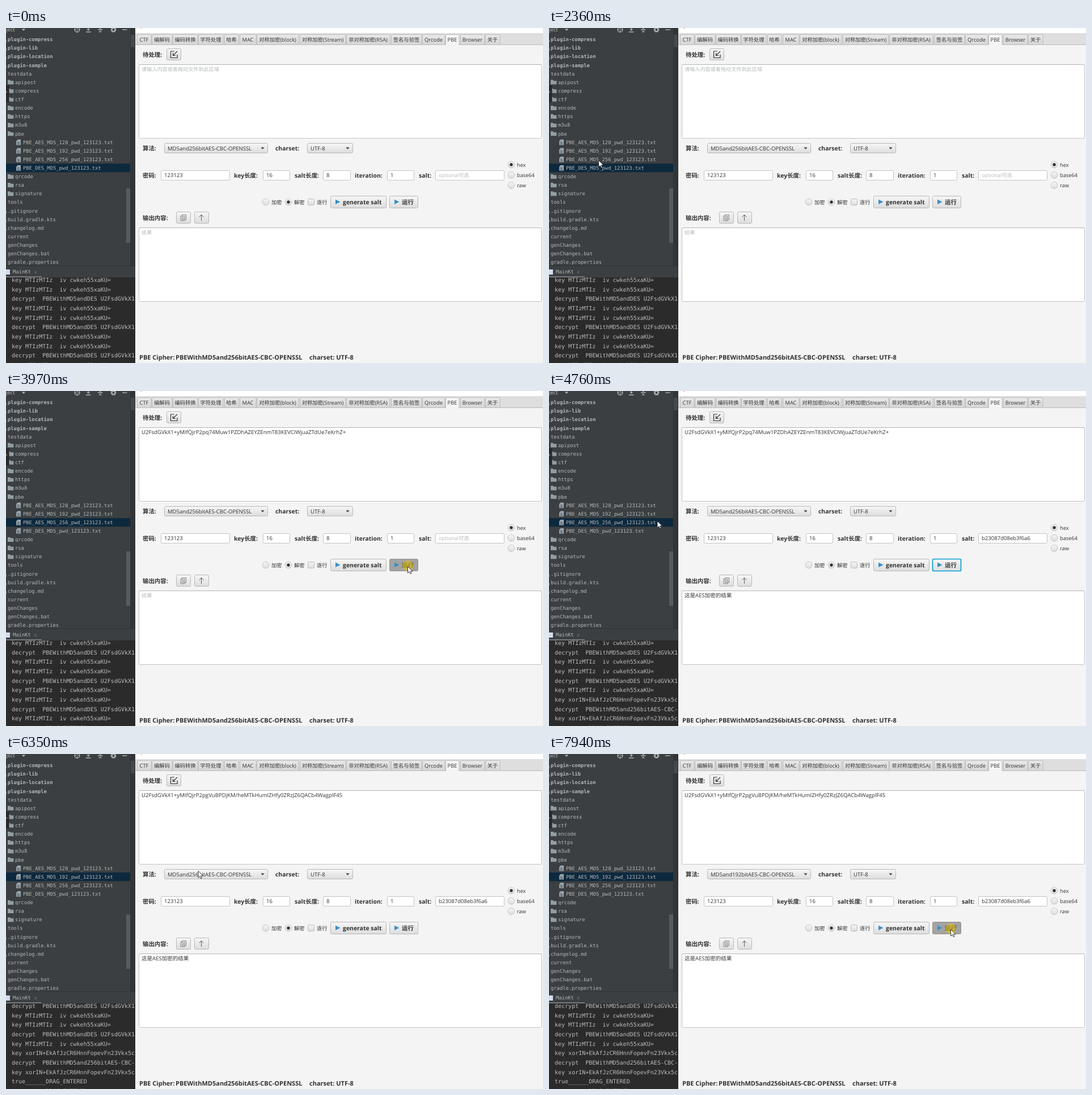
Write an HTML page that moves like this. It is 947x591 px and loops after 8 s.

```html
<!DOCTYPE html>
<html lang="zh-CN">
<head>
<meta charset="utf-8">
<title>PBE Cipher</title>
<style>
html, body { margin: 0; width: 100%; height: 100%; overflow: hidden; background: #f4f4f4; }
svg { display: block; width: 947px; height: 591px; }
text { font: 9.55px "Open Sans", "Noto Sans CJK SC", "Noto Sans", sans-serif; fill: #333; white-space: pre; text-rendering: geometricPrecision; }
.tab { font-size: 9.3px; text-anchor: middle; }
.small { font-size: 9.3px; }
.content { font-size: 9.63px; }
.hint { fill: #b3b8bb; font-size: 9.15px; }
.bold { font-size: 10.45px; font-weight: 700; }
.status { font-size: 11px; font-weight: 700; }
.white { fill: #fff; }
.tree, .log { font-family: "DejaVu Sans Mono", "Noto Sans Mono", monospace; fill: #b5b8ba; }
.tree { font-size: 8.8px; }
.heavy { font-weight: 700; }
.log { font-size: 10.02px; fill: #bbb; }
.head { fill: #bbb; font-size: 9.5px; }
</style>
</head>
<body>
<svg id="stage" viewBox="0 0 947 591" xmlns="http://www.w3.org/2000/svg"></svg>
<script>
const LOOP = 8000;
const BLUE = '#0096c9';
const CIPHER_A = 'U2FsdGVkX1+yMIfQjrP2pq74Muw1PZDhAZEYZEnmT83KEVCIWjuaZTdUe7eKrhZ+';
const CIPHER_B = 'U2FsdGVkX1+yMIfQjrP2pgVuBPDjKM/heMTkHumIZHfy0ZRzJZ6QACb4WagplF45';

// Each step keeps the previous values and overrides some of them.
const steps = [
  { at: 0, cursor: null, row: 15, input: '', salt: '', output: '', log: 'KKDKKDKKDK', run: '', bits: 256, open: false },
  { at: 780, cursor: [174, 233] },
  { at: 1570, cursor: [74, 246] },
  { at: 2360, cursor: [87, 233] },
  { at: 3170, cursor: [522, 270.5], row: 14, input: CIPHER_A, log: 'KDKKDKKDKT' },
  { at: 3970, cursor: [708, 309], run: 'pressed' },
  { at: 4760, cursor: [190.5, 229], run: 'focused', salt: 'b23087d08eb3f6a6', output: '这是AES加密的结果', log: 'KDKKDKXEXT' },
  { at: 5560, cursor: [150, 212], row: 13, run: '' },
  { at: 6350, cursor: [338.5, 206], input: CIPHER_B, log: 'DKKDKXEXTT' },
  { at: 7150, cursor: [350, 247], open: true },
  { at: 7940, cursor: [708, 309], open: false, bits: 192, run: 'pressed' }
];
steps.forEach((s, i) => { steps[i] = { ...steps[i - 1], ...s }; });

const logText = {
  K: 'key MTIzMTIz  iv cwkeh55xaKU=',
  D: 'decrypt  PBEWithMD5andDES U2FsdGVkX1',
  X: 'key xorIN+EkAfJzCR6HnnFopevFn23Vkx5c',
  E: 'decrypt  PBEWithMD5and256bitAES-CBC-',
  T: 'true______DRAG_ENTERED'
};
const tree = [
  '*plugin-compress', '*plugin-lib', '*plugin-location', '*plugin-sample', 'testdata',
  '/apipost', '/compress', '/ctf', '/encode', '/https', '/m3u8', '/pbe',
  '>PBE_AES_MD5_128_pwd_123123.txt', '>PBE_AES_MD5_192_pwd_123123.txt',
  '>PBE_AES_MD5_256_pwd_123123.txt', '>PBE_DES_MD5_pwd_123123.txt',
  '/qrcode', '/rsa', '/signature', 'tools', '.gitignore', 'build.gradle.kts', 'changelog.md',
  'current', 'genChanges', 'genChanges.bat', 'gradle.properties'
];
const tabs = [
  ['CTF', 231, 256], ['编解码', 257, 293], ['编码转换', 294, 338], ['字符处理', 339, 383], ['哈希', 385, 410],
  ['MAC', 412, 441], ['对称加密(block)', 442, 516], ['对称加密(Stream)', 518, 599], ['非对称加密(RSA)', 600, 677],
  ['签名与验签', 679, 733], ['Qrcode', 734, 774], ['PBE', 775, 799], ['Browser', 801, 844], ['关于', 845, 871]
];
const algorithms = [
  'MD5and256bitAES-CBC-OPENSSL', 'MD5and192bitAES-CBC-OPENSSL', 'MD5and128bitAES-CBC-OPENSSL',
  'MD5andRC2', 'MD5andDES', 'MD2andDES', 'SHA1andDES', 'SHA1andRC2',
  'SHA256and256bitAES-CBC-BC', 'SHA256and192bitAES-CBC-BC'
];

const rect = (x, y, w, h, fill, extra = '') =>
  `<rect x="${x}" y="${y}" width="${w}" height="${h}" fill="${fill}" ${extra}/>`;
const path = (d, fill, extra = '') => `<path d="${d}" fill="${fill}" ${extra}/>`;
const line = (d, color, width = 1) => path(d, 'none', `stroke="${color}" stroke-width="${width}"`);
const text = (x, y, str, cls = '') => `<text x="${x}" y="${y}" class="${cls}">${str}</text>`;
const dot = (x, y, r, fill, extra = '') => `<circle cx="${x}" cy="${y}" r="${r}" fill="${fill}" ${extra}/>`;

const box = (x, y, w, h, fill, border = '#b8b8b8', width = 1) =>
  rect(x + .5, y + .5, w - 1, h - 1, fill, `rx="2" stroke="${border}" stroke-width="${width}"`);
const field = (x, w, str, cls) => box(x, 251, w, 18, '#fff', '#c3c3c3') + text(x + 6, 263.2, str, cls);
const area = (y, str, cls) => box(234, y, 711, 131, '#fff', '#c3c3c3') +
  line(`M235 ${y + .5}H944`, '#b3b3b3') + text(239, y + 11.6, str, cls);
const down = (x, y, color = '#444') => path(`M${x - 3.2} ${y - 1.6}h6.4l-3.2 3.6z`, color);
const combo = (x, w, str, focused) =>
  box(x, 203, w, 18, 'url(#face)', focused ? '#039ed3' : '#b8b8b8', focused ? 1.5 : 1) +
  text(x + 6, 215.5, str) + down(x + w - 9.5, 212);
const radio = (x, y, str, on) => dot(x, y, 5.8, 'url(#face)', 'stroke="#b8b8b8" stroke-width=".8"') +
  (on ? dot(x, y, 2.7, '#333') : '') + text(x + 10, y + 3.6, str, 'small');
const play = x => path(`M${x} 302.5l8.5 4.3-8.5 4.3z`, '#3c8fc4');

function treeRows(selected) {
  return rect(0, 239.3 + (selected - 15) * 15.12, 219, 15.2, '#0d293e') + tree.map((entry, i) => {
    const y = 20 + i * 15.12;
    const kind = '*/>'.includes(entry[0]) ? entry[0] : '';
    const label = kind ? entry.slice(1) : entry;
    const x = kind === '/' ? 16 : kind === '>' ? 30 : 3;
    let icon = '';
    if (kind === '/') icon = path(`M3 ${y - 4}h4l1.4 1.6h5v6.4H3z`, '#929da4');
    if (kind === '>') icon = path(`M20.5 ${y - 4.8}h5.5v9.8h-8v-7z`, '#9aa7b0') +
      line(`M19.5 ${y - .5}h4M19.5 ${y + 1.5}h5M19.5 ${y + 3.4}h5`, '#454b50', .8);
    if (kind === '*' || i > 19 && i < 23) icon = rect(0, y + 1, 1, 4, '#7391a6');
    return icon + text(x, y + 3.2, label, 'tree' + (kind === '*' ? ' heavy' : ''));
  }).join('');
}

function header() {
  const c = '#afb1b3';
  return text(0, 6, 'ject', 'head') + down(31, 3, c) +
    dot(125.5, 3, 4.3, 'none', `stroke="${c}" stroke-width="1.3"`) + line('M125.5 -2v4M125.5 4v4M120.5 3h4M126.5 3h4', c, 1.2) +
    line('M141 7h8.5M145.2 -1v4.5M143 2l2.2 2 2.2-2', c, 1.3) +
    line('M162 3h8.5M164.2 -1l2 2 2-2M164.2 7.5l2-2 2 2', c, 1.3) +
    dot(189.5, 3, 3, 'none', `stroke="${c}" stroke-width="2"`) +
    dot(189.5, 3, 4.3, 'none', `stroke="${c}" stroke-width="1.4" stroke-dasharray="1.7"`) +
    line('M205 3h8.5', c, 1.4);
}

function leftPane(s) {
  const rows = [...s.log].map((k, i) => text(10, 448.2 + i * 16.62, logText[k], 'log')).join('');
  return `<g clip-path="url(#left)">` +
    rect(0, 0, 228, 591, '#3c3f41') + rect(219, 0, 9, 420, '#323537') + rect(220, 12, 7, 22, '#45484a') +
    header() + treeRows(s.row) +
    rect(0, 101, 5.5, 30, '#272b2e') + rect(0, 112, 2, 1.5, '#b58b45') +
    rect(212, 283, 7, 96, '#595c5e') +
    rect(0, 419, 228, 1, '#2f3234') + rect(0, 420, 228, 20, '#3c3f41') +
    rect(0, 426, 7, 9, '#d4dcec') + text(12, 433.4, 'MainKt', 'tree') +
    line('M49.5 428.5l4.5 4.5M54 428.5l-4.5 4.5', '#777b7e', .9) +
    rect(0, 440, 228, 151, '#2b2b2b') + rect(0, 438, 63, 2, '#747a80') +
    rows + '</g>';
}

function tabBar() {
  return rect(228, 0, 719, 9, '#fff') + dot(238.5, -1, 2, '#e59a66') +
    rect(228, 9, 719, 21, '#dedede') + rect(228, 29, 719, 1, '#bcbcbc') +
    tabs.map(([name, a, b]) => {
      const active = name === 'PBE';
      const base = active ? 30 : 29;
      return path(`M${a + .5} ${base}V13q0-1.5 1.5-1.5H${b - 1.5}q1.5 0 1.5 1.5V${base}`,
        active ? '#f4f4f4' : 'url(#tabFace)', 'stroke="#bbb"') +
        text((a + b) / 2, 24, name, 'tab');
    }).join('');
}

function runButton(mode) {
  const fill = mode === 'pressed' ? '#a3a3a3' : 'url(#face)';
  const focused = mode === 'focused';
  return box(676, 296, 51, 22, fill, focused ? '#039ed3' : mode ? '#929292' : '#b8b8b8', focused ? 1.7 : 1) +
    play(685) + text(698, 310.8, '运行', 'bold') +
    (mode === 'pressed' ? dot(708.5, 308.5, 9.5, '#e0c010', 'opacity=".62"') : '');
}

function form(s) {
  return text(241, 51, '待处理:', 'bold') + box(283, 36, 26, 21, 'url(#face)') +
    line('M297 41h-6.5v11.5H302V47', '#333', 1.2) + line('M302 41l-7 7M294.5 44v4.5H299', '#333', 1.2) +
    area(64, s.input || '请输入内容或者拖动文件到此区域', s.input ? 'content' : 'hint') +
    text(241, 216, '算法:', 'bold') + combo(279, 183, `MD5and${s.bits}bitAES-CBC-OPENSSL`, s.open) +
    text(475, 216, 'charset:', 'bold') + combo(531, 81, 'UTF-8') +
    text(241, 263.8, '密码:', 'bold') + field(273, 122, '123123') +
    text(402, 263.8, 'key长度:', 'bold') + field(453, 48, '16') +
    text(509, 263.8, 'salt长度:', 'bold') + field(559, 49, '8') +
    text(615, 263.8, 'iteration:', 'bold') + field(672, 48, '1') +
    text(728, 263.8, 'salt:', 'bold') + field(757, 122, s.salt || 'optional可选', s.salt ? '' : 'hint') +
    radio(891, 241, 'hex', true) + radio(891, 259.3, 'base64') + radio(891, 277.5, 'raw') +
    radio(458, 307, '加密') + radio(498, 307, '解密', true) +
    box(532, 301, 12, 12, 'url(#face)') + text(548, 310.6, '逐行', 'small') +
    box(572, 296, 99, 22, 'url(#face)') + play(581) + text(594, 310.8, 'generate salt', 'bold') +
    runButton(s.run) +
    text(241, 339, '输出内容:', 'bold') + box(300, 324, 26, 21, 'url(#face)') + box(332, 324, 26, 21, 'url(#face)') +
    line('M310.5 329.5h7v8.5h-7zM310.5 331.5h-2.5v8.5h7v-2M312 332h4M312 334h4M312 336h4', '#6c6c6c', .8) +
    line('M344.5 340v-10.5M340.5 333.5l4-4 4 4', '#5c5c5c') +
    area(352, s.output || '结果', s.output ? '' : 'hint') +
    text(235, 585.4, 'PBE Cipher:', 'status') + text(299, 585.4, 'PBEWithMD5and256bitAES-CBC-OPENSSL', 'status') +
    text(535, 585.4, 'charset: UTF-8', 'status');
}

function popup() {
  return rect(279, 222, 183, 175, '#fff', 'filter="url(#shadow)"') +
    rect(279.5, 221.5, 182, 175, '#fff', 'stroke="#c0c0c0"') + rect(280, 222, 172, 34.5, BLUE) +
    algorithms.map((name, i) => text(283, 233.7 + i * 17.4, name, i < 2 ? 'white' : '')).join('') +
    rect(452, 222, 9, 174, '#ececec') + box(453, 230, 7, 74, '#d0d0d0', '#b6b6b6') +
    line('M454 226.5l2.5-2 2.5 2M454 391.5l2.5 2 2.5-2', '#888', .9);
}

const pointer = ([x, y]) =>
  path('M.5 .5V12.2l2.8-2.5 1.9 4 1.9-.9-1.9-3.9h3.9z', '#fff',
    `transform="translate(${x} ${y})" stroke="#222" stroke-width=".9" stroke-linejoin="round"`);

const gradient = (id, top, bottom) =>
  `<linearGradient id="${id}" x2="0" y2="1"><stop stop-color="${top}"/><stop offset="1" stop-color="${bottom}"/></linearGradient>`;
const defs = '<defs>' + gradient('face', '#f6f6f6', '#dddddd') + gradient('tabFace', '#e9e9e9', '#d6d6d6') +
  '<clipPath id="left"><rect width="228" height="591"/></clipPath>' +
  '<filter id="shadow" x="-10%" y="-10%" width="120%" height="125%"><feDropShadow dx="0" dy="2" stdDeviation="3" flood-opacity=".4"/></filter></defs>';

const scene = s => defs + rect(228, 0, 719, 591, '#f4f4f4') + leftPane(s) + tabBar() + form(s) +
  (s.open ? popup() : '') + (s.cursor ? pointer(s.cursor) : '');

const stage = document.getElementById('stage');
const start = performance.now();
let shown = null;
function tick() {
  const t = (performance.now() - start) % LOOP;
  const step = steps.findLast(s => s.at <= t);
  if (step !== shown) {
    stage.innerHTML = scene(step);
    shown = step;
  }
  requestAnimationFrame(tick);
}
tick();
</script>
</body>
</html>
```
